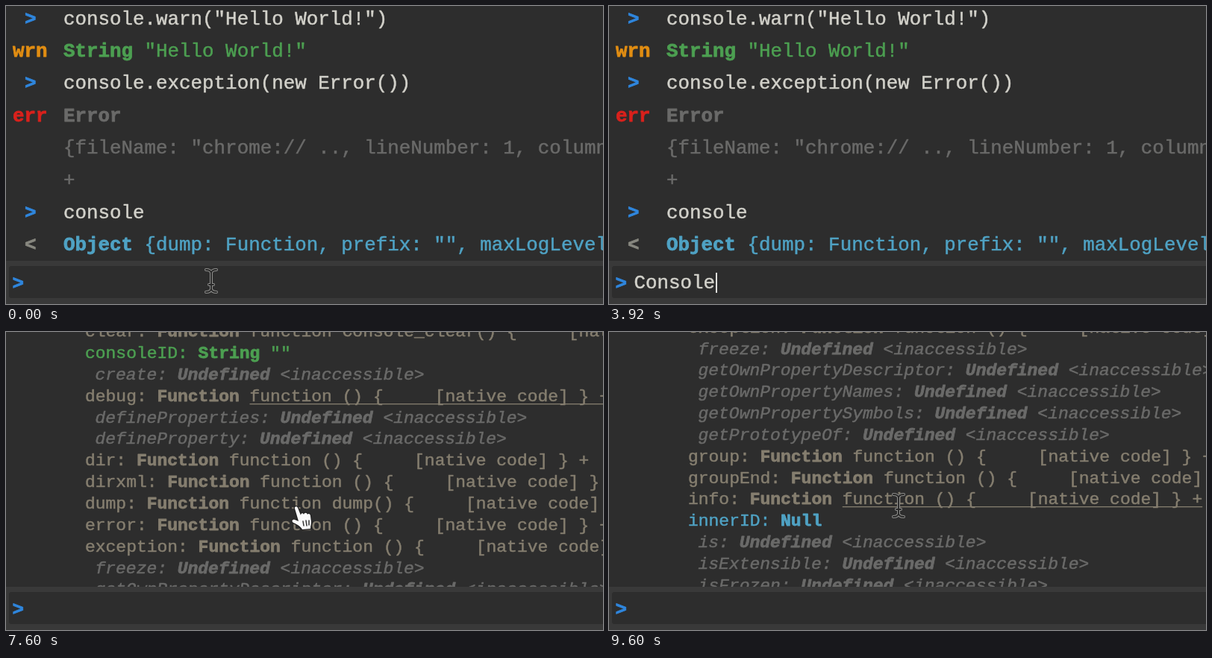
Recreate the animation shown at these times as an HTML page with a canvas. Size 800 px wide and 400 px high, loop 9.76 s.

```html
<!DOCTYPE html>
<html lang="en">
<head>
<meta charset="utf-8">
<title>Console autocomplete</title>
<style>
  html, body { margin: 0; width: 100%; height: 100%; overflow: hidden; background: #2d2d2d; }
  canvas { display: block; width: 800px; height: 400px; }
</style>
</head>
<body>
<canvas id="stage" width="800" height="400"></canvas>
<script>
const ctx = document.getElementById('stage').getContext('2d');
const LOOP = 9760, TICK = 80;
const MONO = '"Liberation Mono", monospace';
const SANS = '"Liberation Sans", sans-serif';
const BIG = 25.85, SMALL = 22.97, ROW = 43.3, SUBROW = 28.85, LOG_BOTTOM = 342;
const C = {
  bg: '#2d2d2d', bar: '#393939', text: '#d2d1ca', blue: '#2f86dd', cyan: '#4fa2c4',
  green: '#4c9f51', orange: '#e18d12', red: '#d9211c', gray: '#6a6a69', tan: '#857e6f',
  arrow: '#87877f', popup: '#383838', selected: '#655d65'
};

// Moments of the story, in ms
const T = { focus: 560, type: 960, key: 160, accept: 3680, enter: 4400, move: 5200,
            hover: 5600, expand: 6000, hover2: 6960, hover3: 8560 };
const BLINK = 560;

const seg = (text, color, style = '') => ({ text, color, style });
const prompt = text => ({ mark: seg('>', C.blue, 'bold'), body: [seg(text, C.text)] });
const nativeCode = name => `function ${name}() {     [native code] }`;

const entries = [
  prompt('console.warn("Hello World!")'),
  { tag: seg('wrn', C.orange, 'bold'), body: [seg('String ', C.green, 'bold'), seg('"Hello World!"', C.green)] },
  prompt('console.exception(new Error())'),
  { tag: seg('err', C.red, 'bold'), body: [seg('Error', C.gray, 'bold')] },
  { body: [seg('{fileName: "chrome:// .., lineNumber: 1, columnNumber: 1}', C.gray)] },
  { body: [seg('+', C.gray)] },
  prompt('console'),
  { mark: seg('<', C.arrow, 'bold'),
    body: [seg('Object ', C.cyan, 'bold'), seg('{dump: Function, prefix: "", maxLogLevel: "all"}', C.cyan)] }
];
const OBJECT = entries.length - 1;
const replies = [
  prompt('Console'),
  { mark: seg('<', C.arrow, 'bold'),
    body: [seg('Function ', C.tan, 'bold'), seg(nativeCode('Console'), C.tan)] }
];

// "*" marks inaccessible members, "=" plain values; the rest are functions
const members = ('assign* clear consoleID=String create* debug defineProperties* defineProperty* dir dirxml ' +
  'dump error exception freeze* getOwnPropertyDescriptor* getOwnPropertyNames* getOwnPropertySymbols* ' +
  'getPrototypeOf* group groupEnd info innerID=Null is* isExtensible* isFrozen* isSealed* keys*')
  .split(' ').map(memberRow);
const DEBUG = 4, INFO = 19;

function memberRow(spec) {
  if (spec.endsWith('*')) {
    return { x: 119.5, body: [seg(spec.slice(0, -1) + ': ', C.gray, 'italic'),
      seg('Undefined ', C.gray, 'italic bold'), seg('<inaccessible>', C.gray, 'italic')] };
  }
  const [name, type] = spec.split('=');
  if (type) {
    const color = type === 'Null' ? C.cyan : C.green;
    return { x: 106, body: [seg(name + ': ', color), seg(type + ' ', color, 'bold'),
      seg(type === 'String' ? '""' : '', color)] };
  }
  const label = { clear: 'Console_clear', dump: 'dump' }[name] || '';
  return { x: 106, body: [seg(name + ': ', C.tan), seg('Function ', C.tan, 'bold'),
    seg(nativeCode(label) + ' +', C.tan)] };
}

const smooth = u => { u = Math.min(1, Math.max(0, u)); return u * u * (3 - 2 * u); };
const ramp = (t, from, to, amount) => amount * smooth((t - from) / (to - from));

const scrollAt = t =>
  ramp(t, 6160, 6960, 150) + ramp(t, 7040, 7840, 191.3) + ramp(t, 8000, 8600, 252.7);

// A thin outline gives the glyphs their heavier typewriter weight
function line(segs, x, y, size, underlined) {
  ctx.lineJoin = 'round';
  segs.forEach((s, i) => {
    ctx.font = `${s.style} ${size}px ${MONO}`;
    ctx.fillStyle = ctx.strokeStyle = s.color;
    ctx.lineWidth = s.style.includes('bold') ? 0.8 : 0.5;
    ctx.fillText(s.text, x, y);
    ctx.strokeText(s.text, x, y);
    const width = ctx.measureText(s.text).width;
    if (underlined && i === segs.length - 1) ctx.fillRect(x, Math.floor(y + 3.5), width, 1.3);
    x += width;
  });
}

function drawEntry(entry, y, underlined) {
  if (entry.mark) line([entry.mark], 25, y, BIG);
  if (entry.tag) line([entry.tag], 9, y, BIG);
  line(entry.body, 77, y, BIG, underlined);
}

function drawLog(t) {
  ctx.save();
  ctx.beginPath();
  ctx.rect(0, 0, 800, LOG_BOTTOM);
  ctx.clip();
  const expanded = t >= T.expand;
  const top = 24.8 - (t >= T.enter ? 2 * ROW : 0) - scrollAt(t);
  const objectHover = t >= T.hover && t < T.hover2;
  entries.forEach((e, i) => drawEntry(e, top + i * ROW, i === OBJECT && objectHover));

  const below = top + OBJECT * ROW;
  if (expanded) {
    const hovered = t >= T.hover3 ? INFO : t >= T.hover2 ? DEBUG : -1;
    members.forEach((m, i) => line(m.body, m.x, below + 36 + i * SUBROW, SMALL, i === hovered));
  } else if (t >= T.enter) {
    replies.forEach((e, i) => drawEntry(e, below + (i + 1) * ROW));
  }
  ctx.restore();
}

function typedAt(t) {
  if (t >= T.enter) return '';
  if (t >= T.accept) return 'Console';
  return 'console'.slice(0, Math.max(0, Math.floor((t - T.type) / T.key) + 1));
}

function caretOn(t) {
  if (t < T.focus || t >= T.expand) return false;
  return t < T.enter || Math.floor((t - T.enter) / BLINK) % 2 === 0;
}

function drawPopup(x, typed) {
  const n = typed.length;
  ctx.save();
  ctx.beginPath();
  ctx.roundRect(x, 206, 171, 142, 4);
  ctx.clip();
  ctx.fillStyle = C.popup;
  ctx.fillRect(x, 206, 171, 142);
  ctx.fillStyle = C.selected;
  ctx.fillRect(x, 298, 171, 50);
  ctx.font = `${BIG}px ${SANS}`;
  ['console', 'ConsoleAPI', 'Console'].forEach((word, i) => {
    const head = word.slice(0, n), left = x + (i === 2 ? 18 : 17), y = [236, 282, 330][i];
    ctx.fillStyle = '#3d88d0';
    ctx.fillText(head, left, y);
    ctx.fillStyle = C.text;
    ctx.fillText(word.slice(n), left + ctx.measureText(head).width, y);
  });
  ctx.restore();
}

function drawInput(t) {
  ctx.fillStyle = C.bar;
  ctx.fillRect(0, LOG_BOTTOM, 800, 400 - LOG_BOTTOM);
  ctx.fillStyle = C.bg;
  ctx.beginPath();
  ctx.roundRect(4, 349, 810, 43, 3);
  ctx.fill();
  line([seg('>', C.blue, 'bold')], 8.5, 380, BIG);

  const typed = typedAt(t);
  line([seg(typed, C.text)], 33.5, 379, BIG);
  const caretX = 34 + typed.length * 15.5;
  if (caretOn(t)) {
    ctx.fillStyle = '#dededb';
    ctx.fillRect(Math.round(caretX), 358, 2, 27);
  }
  if (typed.length >= 4 && t < T.accept) drawPopup(Math.round(caretX) + 1, typed);
}

const beam = new Path2D('M-7-15Q-1-15 0-11Q1-15 7-15M0-11V11M-7 15Q-1 15 0 11Q1 15 7 15M-3 5H3');
const hand = new Path2D('M-1 2C-2-1 2-2 3 1L7 11C7 8 10 7 11 10C12 7 15 7 16 10' +
  'C17 8 20 9 20 12L21 20C21 23 20 25 20 29L9 30C7 26 2 23-3 21C-6 19-4 16-1 17L4 19Z');
const knuckles = new Path2D('M10 19L11 25M14 18L15 25M18 18L18 24');

function drawPointer(t) {
  if (t >= T.type && t < T.move) return;
  const u = smooth((t - T.move) / 480);
  ctx.save();
  ctx.translate(275 + 113 * u, 369 - 136 * u);
  ctx.lineJoin = ctx.lineCap = 'round';
  const stroke = (path, color, width) => {
    ctx.strokeStyle = color;
    ctx.lineWidth = width;
    ctx.stroke(path);
  };
  if (t >= T.hover && t < T.hover3) {
    ctx.translate(0, 2);
    stroke(hand, '#202020', 2.5);
    ctx.fillStyle = '#fafafa';
    ctx.fill(hand);
    stroke(knuckles, '#333', 1.5);
  } else {
    stroke(beam, '#8d8d8b', 4);
    stroke(beam, '#282828', 1.9);
  }
  ctx.restore();
}

function render(now) {
  const t = Math.floor((now % LOOP) / TICK) * TICK;
  ctx.fillStyle = C.bg;
  ctx.fillRect(0, 0, 800, 400);
  drawLog(t);
  drawInput(t);
  drawPointer(t);
}

const start = performance.now();
function loop() {
  render(performance.now() - start);
  requestAnimationFrame(loop);
}
loop();
</script>
</body>
</html>
```
